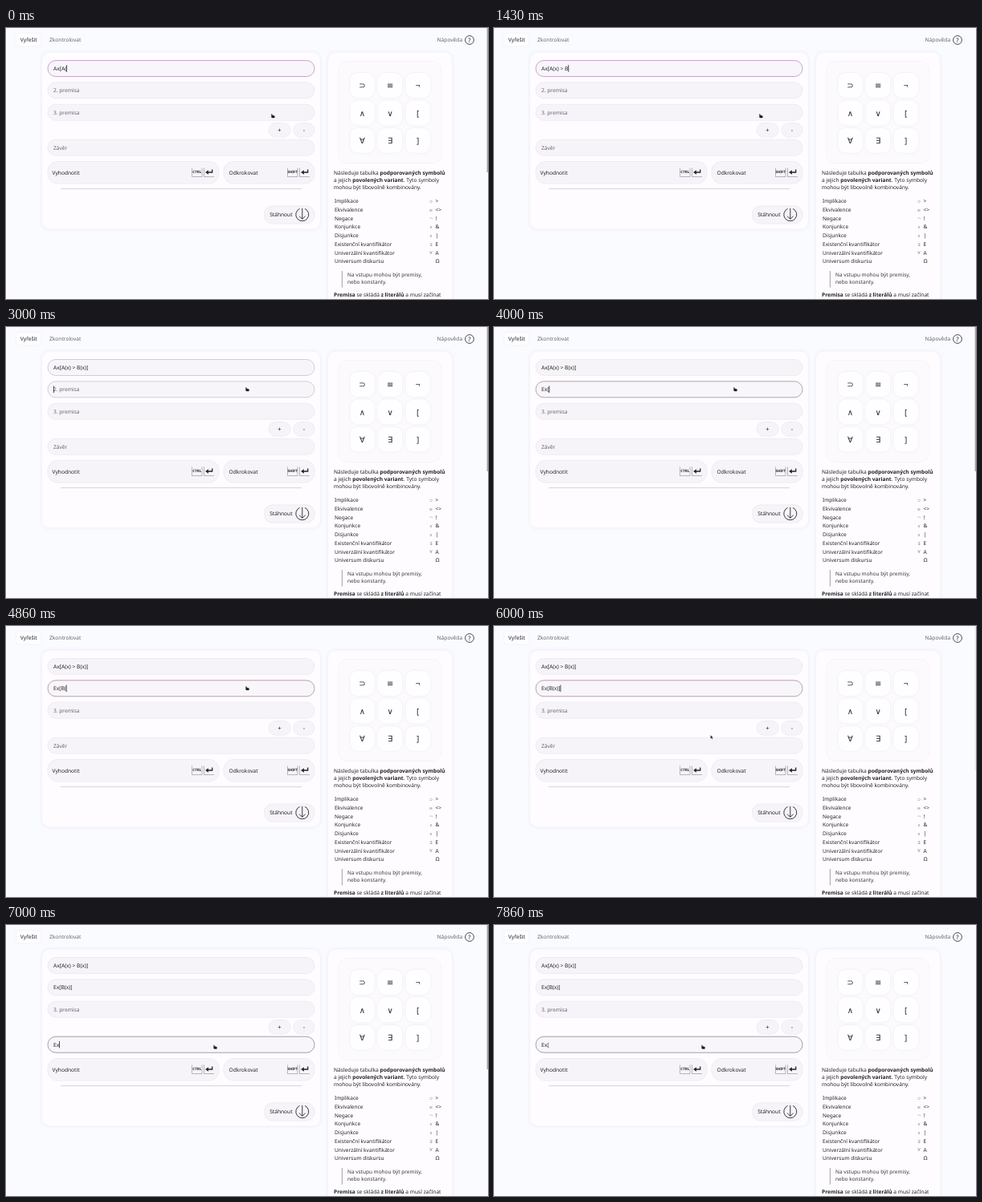
Write an HTML page that moves like this. It is 600x338 px and loops after 8000 ms.

```html
<!DOCTYPE html>
<html lang="cs">
<head>
<meta charset="utf-8">
<title>Vyřešit</title>
<style>
html, body { margin: 0; width: 100%; height: 100%; overflow: hidden; background: #fafbff; }
svg { display: block; width: 100vw; height: 100vh; }
text { font: 6.62px "Noto Sans", "DejaVu Sans", sans-serif; fill: #242328; text-rendering: geometricPrecision; white-space: pre; }
.mute { fill: #67656c; }
.soft { fill: #39373e; }
.mid { text-anchor: middle; }
.value { font-size: 6.68px; }
.sign { font-size: 7.6px; }
.pad { font: 10px "Noto Sans", "DejaVu Sans", sans-serif; }
.tiny { font: 5.2px "DejaVu Sans", sans-serif; fill: #85838a; }
.row { font-size: 6.56px; }
.quote { font-size: 6.48px; }
.key { font: 800 4.5px "Noto Sans", sans-serif; }
.bold { font-weight: 600; }
.card { fill: #fefcff; filter: drop-shadow(0 0 2px #e9e7f1); }
.tile { fill: #fefdff; filter: drop-shadow(0 .3px .9px #ebe8f0); }
.btn { fill: #f6f4f9; stroke: #ebe9ef; stroke-width: .5; filter: drop-shadow(0 .4px .6px #e8e6ed); }
.line { fill: none; stroke: #242328; stroke-width: .9; }
</style>
</head>
<body>
<svg id="stage" viewBox="0 0 600 338" preserveAspectRatio="none"></svg>
<script>
const LOOP = 8000, BLINK = 600, FADE = 300;
const stage = document.getElementById('stage');

const rect = (x, y, w, h, r, cls, extra = '') =>
  `<rect x="${x}" y="${y}" width="${w}" height="${h}" rx="${r}" class="${cls}" ${extra}/>`;
const text = (x, y, s, cls = '', extra = '') => `<text x="${x}" y="${y}" class="${cls}" ${extra}>${s}</text>`;
const path = (d, style = '') => `<path d="${d}" class="line" style="${style}"/>`;
const bold = s => `<tspan class="bold">${s}</tspan>`;

// Each field: top edge, placeholder, focus colour, focus span, typed keys as [time, text]
const fields = [
  { y: 40.5, hint: '', tint: [184, 146, 188], from: -2000, to: 2860, keys: [
    [-150, 'Ax[A('], [135, 'x'], [425, ')'], [705, ' '], [995, '>'], [1135, ' '],
    [1425, 'B'], [1565, '('], [1705, 'x'], [1855, ')'], [2135, ']']] },
  { y: 67.8, hint: '2. premisa', tint: [168, 142, 148], from: 2860, to: 6430, keys: [
    [3285, 'E'], [3565, 'x'], [3855, '['], [4425, 'B'],
    [4855, '('], [4995, 'x'], [5135, ')'], [5425, ']']] },
  { y: 95.2, hint: '3. premisa', tint: [130, 128, 138], from: 9e9, to: 9e9, keys: [] },
  { y: 139.2, hint: 'Závěr', tint: [140, 138, 149], from: 6430, to: 9e9, keys: [
    [6695, 'E'], [6850, 'x'], [7255, '[']] }
];

// Pointer positions as [time, x, y]
const track = [[0, 332.3, 109.8], [2530, 332.3, 109.8], [2800, 300.4, 77.8], [5930, 300.4, 77.8],
  [6000, 271.3, 138.5], [6145, 260.4, 152.3], [LOOP, 260.4, 152.3]];

// The scrollbar shows while the pointer moves and fades afterwards
const scrollSpans = [[-2000, 450], [2560, 4300], [5940, 7550]];

function enterKey(x) {
  return path(`M${x} 174.5V185.5H${x + 12.5}`, 'stroke:#77757c;stroke-width:.5') +
    path(`M${x + 10.2} 176.4V180H${x + 4}`, 'stroke-width:1.3') +
    `<path d="M${x + 1.6} 180l3.8-2.8v5.6z" fill="#242328"/>`;
}

function labelKey(x, s) {
  return path(`M${x} 174.5V185.5H${x + 12.5}V174.5`, 'stroke-width:.5;stroke:#77757c') +
    text(x + 6.3, 181.3, s, 'key mid');
}

function header() {
  return rect(13, 7, 30, 15.5, 4, 'tile') + text(17.8, 17.4, 'Vyřešit') +
    text(54, 17.4, 'Zkontrolovat', 'mute') + text(536.6, 17.4, 'Nápověda', 'mute') +
    '<circle cx="577" cy="15" r="5.4" class="line" style="stroke-width:.8"/>' +
    text(577, 17.8, '?', 'sign mid');
}

function form() {
  const inputs = fields.map((f, i) =>
    rect(52, f.y, 332, 20, 10, '', `id="box${i}"`) + text(59, f.y + 12.4, '', '', `id="val${i}"`)).join('');
  return rect(45, 30.5, 346, 220, 9, 'card') + inputs +
    rect(327, 118.5, 27, 17.5, 8.7, 'btn') + text(340.5, 129.9, '+', 'sign mid') +
    rect(358, 118.5, 26, 17.5, 8.7, 'btn') + text(371, 129.9, '-', 'sign mid') +
    rect(52, 166.5, 213, 27.5, 12, 'btn') + text(57.5, 182.6, 'Vyhodnotit') +
    labelKey(231.5, 'CTRL') + enterKey(246.5) +
    rect(271, 166.5, 113, 27.5, 12, 'btn') + text(277.5, 182.6, 'Odkrokovat') +
    labelKey(350.5, 'SHIFT') + enterKey(365.5) +
    path('M68 200.6H368', 'stroke:#cbc9d0;stroke-width:.8') +
    rect(321.5, 222, 62.5, 22, 10, 'btn') + text(328.2, 235, 'Stáhnout') +
    path('M365.6 225.4A8 8 0 1 0 372 225.4M368.8 224.8V238.2M365 234.6L368.8 238.4L372.6 234.6');
}

function help() {
  const pad = [...'⊃≡¬∧∨[∀∃]'].map((s, i) => {
    const x = 443.5 + i % 3 * 34.6, y = 71.5 + Math.floor(i / 3) * 34.4;
    return rect(x - 15.2, y - 15.4, 30.4, 30.8, 9, 'tile') + text(x, y + 3.9, s, 'pad mid');
  }).join('');
  const rows = [
    ['Implikace', '⊃', '&gt;'], ['Ekvivalence', '≡', '&lt;&gt;'], ['Negace', '¬', '!'],
    ['Konjunkce', '∧', '&amp;'], ['Disjunkce', '∨', '|'], ['Existenční kvantifikátor', '∃', 'E'],
    ['Univerzální kvantifikátor', '∀', 'A'], ['Universum diskursu', '', 'Ω']
  ].map(([name, sign, key], i) => {
    const y = 218.2 + i * 10.73;
    return text(409, y, name, 'row') + text(529, y - .2, sign, 'tiny mid') + text(534.6, y, key);
  }).join('');
  return rect(401, 30.5, 154, 330, 9, 'card') +
    rect(414, 41.5, 128, 127, 11, '', 'fill="#fcfafd" stroke="#f3f1f6" stroke-width=".7"') + pad +
    text(408, 183.2, `Následuje tabulka ${bold('podporovaných symbolů')}`) +
    text(408, 192.2, `a jejich ${bold('povolených variant')}. Tyto symboly`) +
    text(408, 201.2, 'mohou být libovolně kombinovány.') + rows +
    path('M418.4 303V323.5', 'stroke:#8d8b92;stroke-width:.8') +
    text(425, 310.4, 'Na vstupu mohou být premisy,', 'soft quote') +
    text(425, 319.4, 'nebo konstanty.', 'soft quote') +
    text(408, 334.8, `${bold('Premisa')} se skládá ${bold('z literálů')} a musí začínat`);
}

stage.innerHTML = header() + form() + help() +
  rect(598.6, 0, 1.4, 180, .6, '', 'id="scroll" fill="#a5a4a8"') +
  '<rect id="caret" width=".75" height="8.6" fill="#151418"/>' +
  '<g id="mouse"><path id="hand" d="M-2.2-2.1h1.1l.5 1.3 2.3.5.5.7-.3 1.8H-1.2L-2.4.5-1.4.1z" fill="#1d1c20" stroke="#1d1c20" stroke-width=".3"/>' +
  '<path id="arrow" d="M-1.8-2.6V2L-.7 1.1.2 2.7 1 2.3.3.7H1.7z" fill="#17161a" stroke="#fff" stroke-width=".3"/></g>';

const get = id => document.getElementById(id);
const boxes = fields.map((_, i) => get('box' + i));
const values = fields.map((_, i) => get('val' + i));
const caret = get('caret'), mouse = get('mouse'), hand = get('hand'), arrow = get('arrow'), scroll = get('scroll');

const clamp = v => Math.max(0, Math.min(1, v));
const mix = (a, b, k) => `rgb(${a.map((v, i) => Math.round(v + (b[i] - v) * k))})`;
// Rises to 1 after `from`, falls back to 0 after `to`
const pulse = (t, from, to) => clamp((t - from) / FADE) * (1 - clamp((t - to) / FADE));

function drawField(f, i, t) {
  const typed = f.keys.filter(k => k[0] <= t);
  const value = typed.map(k => k[1]).join('');
  const focus = pulse(t, f.from, f.to);
  boxes[i].style.fill = mix([246, 244, 249], [248, 246, 251], focus);
  boxes[i].style.stroke = mix([232, 230, 236], f.tint, focus);
  boxes[i].style.strokeWidth = .7 + .1 * focus;
  const shown = value || f.hint;
  if (values[i].textContent !== shown) values[i].textContent = shown;
  values[i].setAttribute('class', value ? 'value' : 'mute');
  if (t < f.from || t >= f.to) return;
  const last = typed.length ? typed[typed.length - 1][0] : f.from;
  const width = value ? values[i].getComputedTextLength() : 0;
  caret.setAttribute('x', 59 + width);
  caret.setAttribute('y', f.y + 5.7);
  caret.style.opacity = Math.floor((t - last) / BLINK) % 2 ? 0 : 1;
}

function drawMouse(t) {
  const n = track.findIndex(p => p[0] > t);
  const [t0, x0, y0] = track[n - 1], [t1, x1, y1] = track[n];
  const k = (t - t0) / (t1 - t0);
  const x = x0 + (x1 - x0) * k, y = y0 + (y1 - y0) * k;
  const over = fields.some(f => y > f.y && y < f.y + 20);
  mouse.setAttribute('transform', `translate(${x} ${y})`);
  hand.style.display = over ? '' : 'none';
  arrow.style.display = over ? 'none' : '';
}

function draw(t) {
  fields.forEach((f, i) => drawField(f, i, t));
  drawMouse(t);
  scroll.style.opacity = Math.max(...scrollSpans.map(([from, to]) => pulse(t, from, to)));
}

const start = performance.now();
function tick() {
  draw((performance.now() - start) % LOOP);
  requestAnimationFrame(tick);
}
tick();
</script>
</body>
</html>
```
